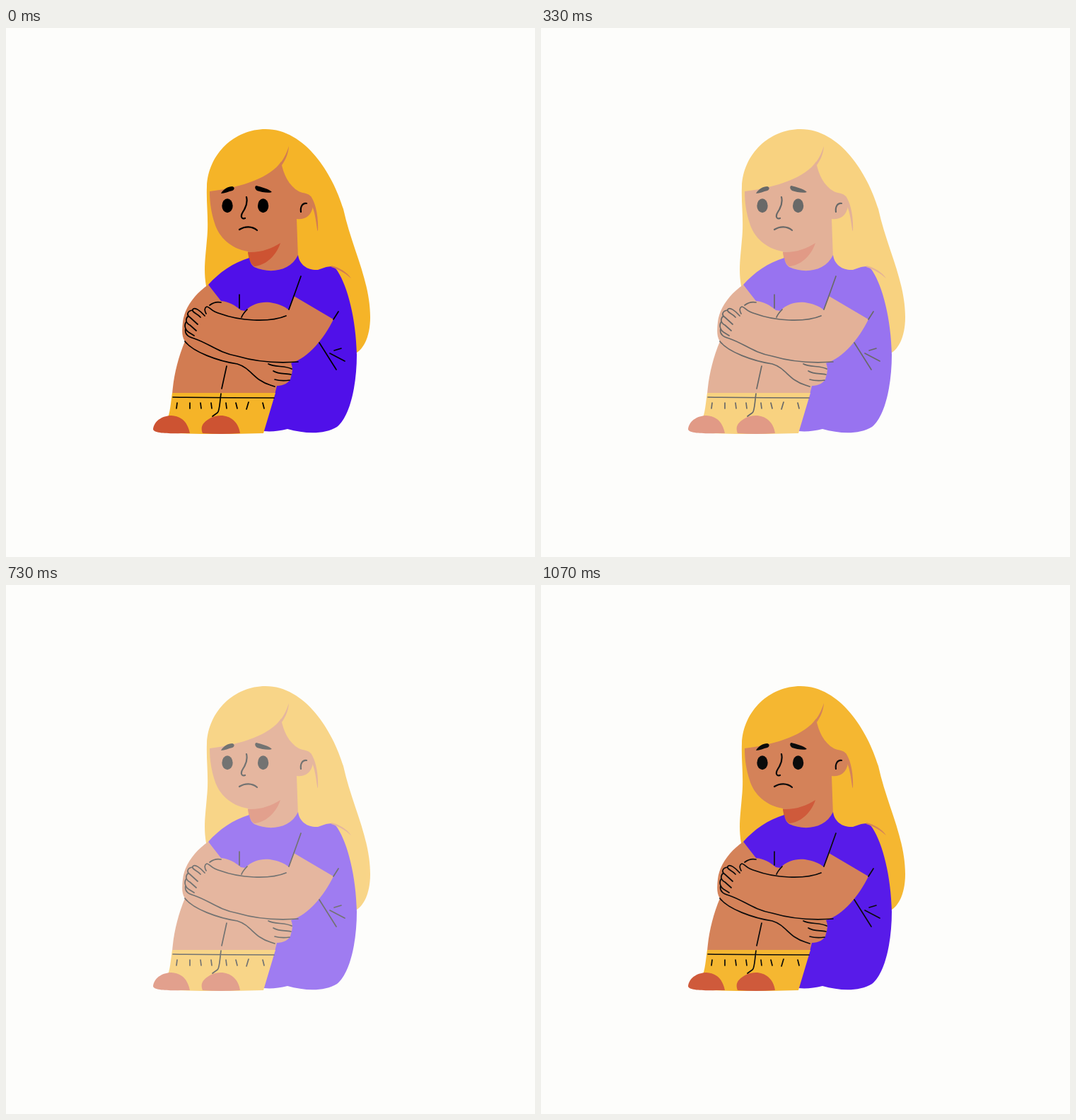
Recreate the animation shown at these times as an HTML page. Size 748 px wide and 748 px high, loop 1110 ms.

```html
<!DOCTYPE html>
<html lang="en">
<head>
<meta charset="utf-8">
<title>Sad girl</title>
<style>
  html, body { margin: 0; width: 100%; height: 100%; overflow: hidden; background: #fdfdfb; }
  svg { display: block; width: 100%; height: 100%; }
  .hair { fill: #f5b428; }
  .skin { fill: #d27c52; }
  .red { fill: #cd5332; }
  .shirt { fill: #5010e9; }
  .line { fill: none; stroke: #000; stroke-width: 1.7; stroke-linecap: round; stroke-linejoin: round; }
</style>
</head>
<body>
<svg viewBox="0 0 748 748">
  <g id="girl">
    <path class="hair" d="M283 365C279 342 282 325 284 300C287 272 283 250 284 224C286 178 323 143 367 143C423 143 462 206 477 256C489 311 515 357 515 409C515 434 507 452 496 459L400 450L300 370Z"/>

    <!-- head and neck -->
    <path class="skin" d="M288 231C335 225 374 211 389 189C392 207 400 223 414 231C420 234 427 233 431 238C436 246 435 259 427 266C422 270 416 271 411 270L413 326Q380 356 346 338L342 316C318 312 301 296 295 276C290 261 288 246 288 231Z"/>
    <path class="skin" d="M388 191C394 183 397 176 400 167C399 178 396 185 390 194ZM431 238C438 247 442 268 441 287C439 286 439 261 430 246Z"/>
    <path class="red" d="M342 317C360 318 375 312 388 304C382 323 366 336 351 337C345 333 343 325 342 317Z"/>

    <!-- shirt -->
    <path class="shirt" d="M286 363C301 346 321 332 344 325C345 331 347 335 351 338C373 348 402 344 413 321C415 336 428 343 441 342C451 339 462 332 469 344C483 366 495 411 496 462C496 506 486 550 468 564C450 575 423 574 398 567C386 570 375 571 364 570L380 500L310 400Z"/>
    <path class="skin" d="M460 336C472 339 482 345 488 354C479 346 470 341 460 338Z"/>

    <!-- knees, legs and arms -->
    <path class="skin" d="M286 363L304 386C315 387 324 392 332 399L338 400C350 388 366 386 378 389C388 391 396 395 400 399L407 379L463 412C449 440 428 466 403 474C406 481 405 487 403 493C402 502 391 506 383 506L380 518H235C237 492 243 467 253 443C248 436 249 426 250 416C252 396 267 376 286 363Z"/>
    <path class="hair" d="M235 516H381L364 573Q300 575 240 573L228 553C232 545 233 530 235 516Z"/>
    <path class="red" d="M208 567C210 554 223 548 234 548C249 549 257 558 260 573C242 573 208 575 208 567ZM278 573C274 563 279 557 290 551C309 543 328 552 331 573Q304 575 278 573Z"/>

    <!-- face -->
    <ellipse cx="313" cy="251.300" rx="7.600" ry="10"/>
    <ellipse cx="363.600" cy="251.300" rx="7.600" ry="10"/>
    <path d="M304 234C307 228 314 224 320 224C324 225 323 229 320 230C315 231 309 234 304 234ZM354 223C361 225 371 227 376 232C371 234 361 232 355 230C351 227 352 223 354 223Z"/>
    <path class="line" style="stroke-width:2.200" d="M340 239C342 247 339 254 335 260C331 266 333 271 338 269M330 285C338 280 348 280 355 286M425 248C419 247 416 253 417 260"/>

    <!-- folds in the shirt -->
    <path class="line" d="M417 351L407 379L400 398M330 377V396M463 412L470 401M443 445L467 483M458 460L479 471M464 456L474 453"/>

    <!-- hugging arms -->
    <path class="line" d="M333 409C335 404 338 401 341 398M288 392C293 388 299 387 304 388M283 404C280 399 281 395 284 394C289 395 290 401 303 404C330 414 372 417 396 407M281 407C275 400 267 394 264 398C262 402 271 404 275 409M264 399C256 400 255 406 260 409L271 419M258 407C253 411 254 417 260 420L269 428M255 415C251 421 254 427 258 430L266 435M254 425C252 434 259 437 266 439C287 446 300 459 327 464C354 472 386 474 413 472M253 443C264 458 300 471 327 475C347 481 350 498 374 505L380 507M371 475C380 480 394 477 404 482M378 485C386 490 396 488 403 490M380 497C387 499 395 499 401 498"/>
    <path class="line" d="M312 478L305 510M304 517C302 531 302 542 299 544L292 549M236 522Q307 523 379 523"/>
    <path class="line" d="M242 530L241 538M260 530V538M275 530L276 538M290 530L291 538M311 530L312 538M325 530L327 538M343 529L340 539M363 530L365 538"/>
  </g>
</svg>
<script>
  const girl = document.getElementById('girl');
  const LOOP = 1110, STEP = 100 / 3, HALF = 16.5, DIM = 0.38;

  // Fade out and back in at thirty steps a second.
  function draw(now) {
    const step = Math.floor((now % LOOP + 3.4) / STEP);
    const away = Math.min(1, Math.abs(step - HALF) / HALF);
    girl.setAttribute('opacity', DIM + (1 - DIM) * away ** 1.22);
    requestAnimationFrame(draw);
  }
  draw(performance.now());
</script>
</body>
</html>
```
